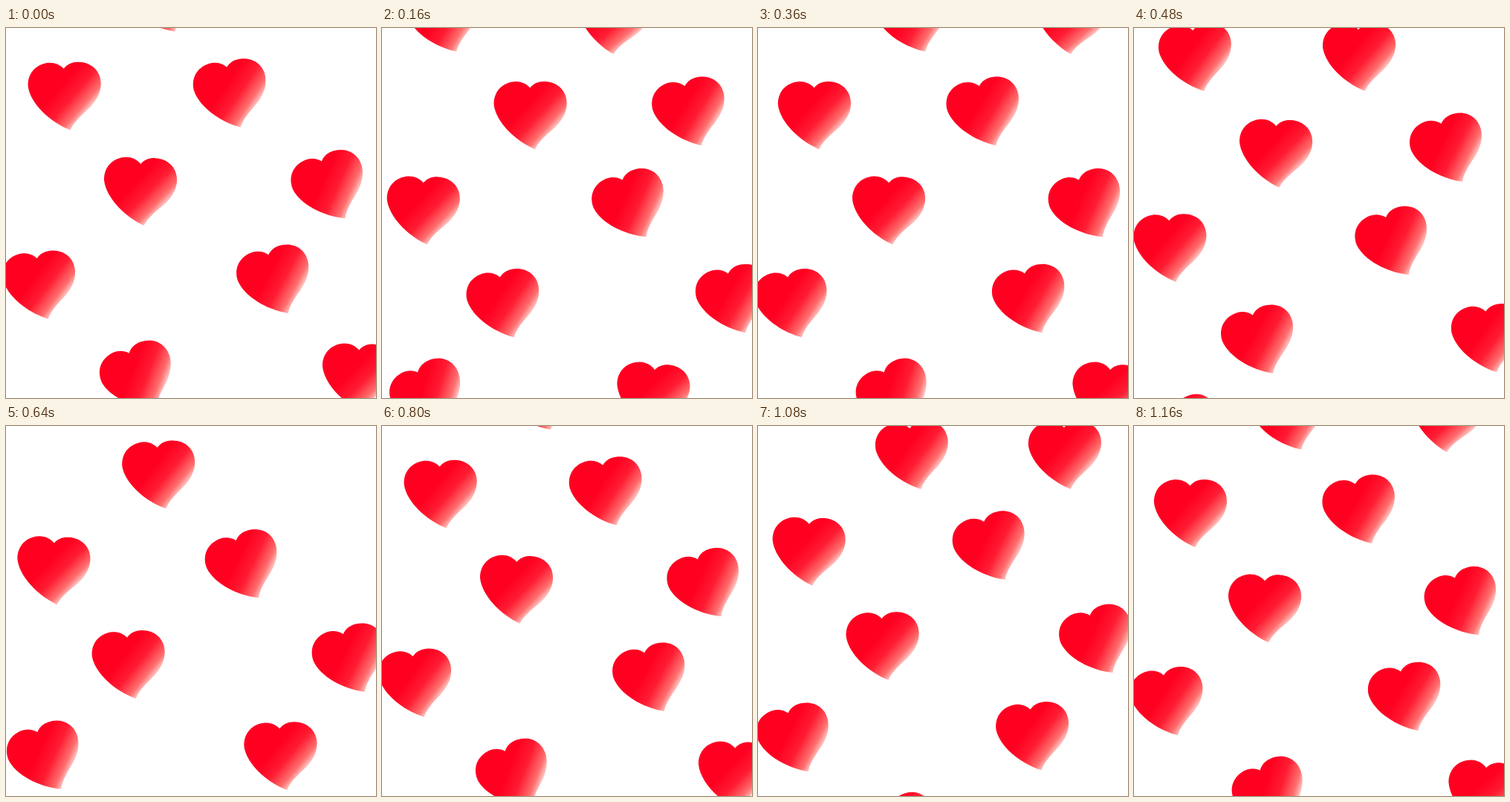
An HTML page with a canvas that plays this animation: 498 px wide and 498 px high, repeating every 1.2 s.

```html
<!DOCTYPE html>
<html lang="en">
<head>
<meta charset="utf-8">
<title>Rising hearts</title>
<style>
  html, body { margin: 0; width: 100%; height: 100%; overflow: hidden; background: #fff; }
  canvas { display: block; }
</style>
</head>
<body>
<canvas id="stage" width="498" height="498"></canvas>
<script>
const SIZE = 498;
const STEP = 40;      // ms per picture
const CYCLE = 10;     // steps until each heart takes the place of the next
const ctx = document.getElementById('stage').getContext('2d');

const heart = new Path2D(
  'M0 -35 C-5 -41 -12 -44 -20 -44 C-38 -43 -50 -30 -49 -12 ' +
  'C-46 10 -23 35 5 48 C9 39 18 31 29 22 C41 12 48 1 49 -12 ' +
  'C50 -29 38 -42 20 -43 C12 -43.5 5 -41 0 -35 Z');

const fill = ctx.createLinearGradient(-30, 15, 8, 51);
fill.addColorStop(0, '#ff0021');
fill.addColorStop(0.4, '#ff1c32');
fill.addColorStop(0.75, '#ff6e6e');
fill.addColorStop(1, '#fff0ec');

const swing = (n, peak, speed) => 31 * (1 - Math.cos(speed * (n - peak)));

// Two swaying paths; n counts steps along the way up.
const leftPath = {
  sway: n => {
    const u = n - 4.6;
    return -Math.cos(u * (0.2513 - 0.00227 * u));
  },
  y: n => 470 - 24.9 * n - 0.03 * n * n,
  tilt: n => swing(n, 11, 0.12) - 0.7
};
const rightPath = {
  sway: n => Math.cos(Math.PI * (n + 3.2) / 14),
  y: n => 339 - 25.55 * n + 0.06 * n ** 2 - 0.0022 * n ** 3,
  tilt: n => 19.4 - swing(n, 3.9, 0.135)
};

const streams = [
  { path: leftPath, x: 187.3, amp: 22.8, lag: 0 },
  { path: leftPath, x: 65.4, amp: 19.6, lag: 5 },
  { path: rightPath, x: 336.7, amp: 34.2, lag: 0 },
  { path: rightPath, x: 445, amp: 32.6, lag: 5, blinks: true }
];

function drawHeart({ path, x, amp }, n) {
  ctx.save();
  ctx.translate(x + amp * path.sway(n), path.y(n));
  ctx.rotate(-path.tilt(n) * Math.PI / 180);
  ctx.fillStyle = fill;
  ctx.fill(heart);
  ctx.restore();
}

function draw(time) {
  const step = Math.floor(time / STEP) % CYCLE;
  ctx.fillStyle = '#fff';
  ctx.fillRect(0, 0, SIZE, SIZE);
  for (const s of streams) {
    for (let n = step - s.lag - CYCLE; n <= 22; n += CYCLE) {
      const y = s.path.y(n);
      const hidden = s.blinks && n > 10 && n % 2 === 1;
      if (y > -60 && y < SIZE + 60 && !hidden) drawHeart(s, n);
    }
  }
}

const start = performance.now();
function tick() {
  draw(performance.now() - start);
  requestAnimationFrame(tick);
}
tick();
</script>
</body>
</html>
```
